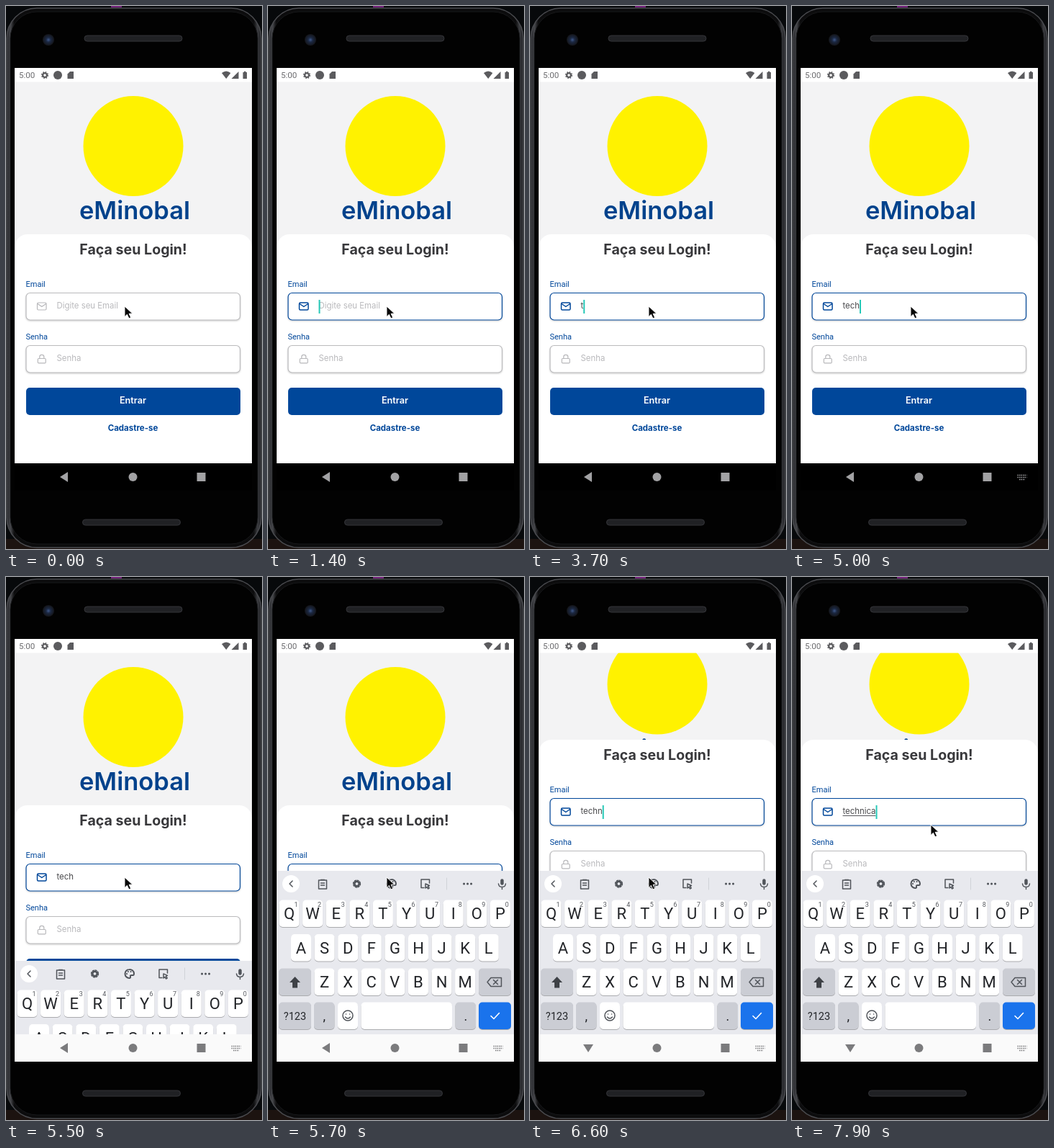
An HTML page that plays this animation: 356 by 754 pixels, repeating every 8000 ms.

```html
<!DOCTYPE html>
<html lang="pt">
<head>
<meta charset="utf-8">
<title>Login</title>
<style>
  html, body { margin: 0; width: 100%; height: 100%; overflow: hidden; background: #07090b; }
  svg { display: block; width: 356px; height: 754px; }
  text { font-family: Inter, sans-serif; }
  .sys { font-family: Roboto, sans-serif; }
  .mid { text-anchor: middle; }
  .field { fill: #fff; stroke: #bcbcbe; stroke-width: 1.2; filter: drop-shadow(0 1.5px 1.2px #0003); }
  .icon { fill: none; stroke: #b8b8bb; stroke-width: 1.2; stroke-linejoin: round; stroke-linecap: round; }
  .focus .field { stroke: #00479a; }
  .focus .icon { stroke: #00479a; stroke-width: 1.5; }
  .hint { font-size: 11.4px; fill: #b9b9bc; }
  .label { font-size: 11px; fill: #00479a; }
  .tool { fill: none; stroke: #50545a; stroke-width: 1.5; stroke-linecap: round; stroke-linejoin: round; }
  .key { filter: drop-shadow(0 1px .4px #0004); }
</style>
</head>
<body>
<svg viewBox="0 0 356 754">
  <defs>
    <linearGradient id="edge">
      <stop offset="0" stop-color="#25262a"/><stop offset=".015" stop-color="#46474b"/>
      <stop offset=".03" stop-color="#0c0c0d"/><stop offset=".97" stop-color="#0c0c0d"/>
      <stop offset=".985" stop-color="#3c3d41"/><stop offset="1" stop-color="#202125"/>
    </linearGradient>
    <radialGradient id="lens">
      <stop offset="0" stop-color="#40598a"/><stop offset=".4" stop-color="#1b2842"/><stop offset="1" stop-color="#141519"/>
    </radialGradient>
    <clipPath id="screen"><rect x="12" y="86" width="330" height="587"/></clipPath>
    <clipPath id="page"><rect x="12" y="105" width="330" height="530"/></clipPath>
    <g id="gear">
      <circle r="3.2" fill="none" stroke-width="2.6"/>
      <circle r="4.9" fill="none" stroke-width="1.5" stroke-dasharray="2 1.85"/>
    </g>
  </defs>

  <!-- phone body -->
  <rect width="356" height="754" fill="#07090b"/>
  <rect x="146" width="15" height="2" fill="#75227c"/>
  <rect y="740" width="356" height="14" fill="#1c1310"/>
  <rect x="1" y="3" width="354" height="749" rx="42" fill="url(#edge)" stroke="#4a4b4f" stroke-width="1.5"/>
  <rect x="6" y="8" width="344" height="739" rx="37" fill="#020202" stroke="#17181a"/>
  <circle cx="59" cy="47" r="8" fill="url(#lens)"/>
  <g fill="#202124" stroke="#343539">
    <rect x="109" y="41" width="136" height="8" rx="4"/>
    <rect x="106.500" y="713" width="136" height="8" rx="4"/>
  </g>
  <rect x="12" y="86" width="330" height="587" fill="#000"/>

  <!-- login page -->
  <g clip-path="url(#page)">
    <rect x="12" y="105" width="330" height="530" fill="#f3f3f4"/>
    <g id="brand">
      <circle cx="177" cy="194.500" r="69.500" fill="#fff200"/>
      <text class="mid" x="179" y="296" font-size="34.5" font-weight="600" fill="#00428c">eMinobal</text>
    </g>
    <g id="card">
      <rect x="12" y="317" width="330" height="440" rx="18" fill="#fff"/>
      <text class="mid" x="177" y="345" font-size="19.6" font-weight="700" fill="#38383b">Faça seu Login!</text>
      <text class="sys label" x="27.500" y="390">Email</text>
      <g id="email">
        <rect class="field" x="28" y="398.500" width="297.500" height="37.500" rx="5.500"/>
        <path class="icon" d="M45 412h9.500q1.500 0 1.500 1.500v7q0 1.500-1.500 1.500H45q-1.500 0-1.500-1.500v-7q0-1.500 1.500-1.500zM44 413.500l5.800 4 5.800-4"/>
        <text class="hint" id="hint" x="70.500" y="420">Digite seu Email</text>
        <text class="hint" id="typed" x="70.500" y="420" style="fill:#48484b"></text>
        <rect id="underline" x="70.500" y="422" height="1" fill="#55555a"/>
        <rect id="caret" y="408" width="2" height="19" fill="#27c9b8"/>
      </g>
      <text class="sys label" x="27.500" y="463">Senha</text>
      <rect class="field" x="28" y="471.500" width="297.500" height="37.500" rx="5.500"/>
      <path class="icon" d="M45.500 489.500h8.500q1.200 0 1.200 1.200v4q0 1.200-1.200 1.200h-8.500q-1.200 0-1.200-1.200v-4q0-1.200 1.200-1.200zM46.800 489v-2q0-2.700 3-2.700t3 2.700v2"/>
      <text class="hint" x="70.500" y="493">Senha</text>
      <rect x="28" y="530" width="298" height="38" rx="5" fill="#00479a"/>
      <text class="mid" x="176.500" y="552" font-size="12.7" font-weight="600" fill="#fff">Entrar</text>
      <text class="mid" x="176.500" y="590" font-size="11.5" font-weight="700" fill="#00479a">Cadastre-se</text>
    </g>
  </g>

  <!-- status bar -->
  <rect x="12" y="86" width="330" height="19.500" fill="#fff"/>
  <g fill="#5b5b5e">
    <text class="sys" x="18" y="100" font-size="11.6" fill="#6b6b6e">5:00</text>
    <use href="#gear" x="54" y="96" stroke="#5b5b5e" transform="translate(5.400 9.600) scale(.9)"/>
    <circle cx="72" cy="96" r="6"/>
    <path d="M89 91h5v10h-8.500v-6.500z"/>
    <path d="M300 93q6.200-5 12.400 0l-6.200 8z"/>
    <path d="M323.500 91v10h-10zM329.500 92h1.500v-1.200h2.500V92h1.500v9h-5.500z"/>
  </g>

  <!-- keyboard and navigation -->
  <g clip-path="url(#screen)">
    <g id="keyboard">
      <rect x="12" y="408" width="330" height="265" fill="#e8e9ee"/>
      <circle cx="32" cy="426" r="12" fill="#fff"/>
      <g class="tool">
        <path d="M34 422l-4 4 4 4"/>
        <path d="M70.500 421h11v12h-11zM73.500 420.500h5M73.500 425h5M73.500 428h5"/>
        <use href="#gear" x="123.500" y="426"/>
        <path d="M171.500 420a6 6 0 0 0 0 12q2 0 1.500-2t1.500-2h2q1.500 0 1.500-2.500a6 6 0 0 0-6.500-5.500zM168 426h.1M169.800 423h.1M173.500 423h.1" stroke-width="2"/>
        <path d="M217 431.500h-4v-11.500h11.500v5M219 426l5.500 2.500-2.200 1 2 2.500-1.500 1-2-2.500-1.800 1.500z"/>
        <path d="M248.500 418v16" stroke="#d0d2d7" stroke-width="1"/>
        <path d="M272.500 426h.1M277.500 426h.1M282.500 426h.1" stroke-width="3"/>
        <path d="M325.500 421.500v4" stroke-width="4.500"/>
        <path d="M320.500 426q.500 4.500 5 4.500t5-4.500M325.500 430.500v3"/>
      </g>
      <g id="keys"></g>
      <path d="M37.500 555l7.500 8h-4v7.500h-7V563h-4z" fill="#3e4146"/>
      <g class="tool">
        <path d="M310 556.500h14.500v12H310l-5-6zM313.500 559.500l6 6M319.500 559.500l-6 6"/>
        <circle cx="111" cy="609" r="7"/>
        <path d="M108.500 607h.1M113.500 607h.1M107.500 611q3.500 4 7 0"/>
        <path d="M310 609.500l4 4 7.500-8" stroke="#fff" stroke-width="1.6"/>
      </g>
    </g>
    <rect id="navBack" x="12" y="635" width="330" height="38" fill="#fafafa"/>
    <g id="nav">
      <path id="back" d="M75 654l11-7v14z"/>
      <circle cx="176.500" cy="654" r="6"/>
      <rect x="265.500" y="648" width="12" height="12"/>
      <path id="imeIcon" d="M313.500 651.500h13M313.500 654.500h13M316 657.500h8" fill="none" stroke-width="1.5" stroke-dasharray="1.500 1"/>
    </g>
  </g>
  <path id="mouse" d="M0 0v14.500l3.400-3.200 2.600 5.500 2.600-1.200-2.500-5.300 4.700-.300z" fill="#080808" stroke="#fff" stroke-width=".9"/>
</svg>
<script>
const LOOP = 8000;
const $ = id => document.getElementById(id);

function key(x, y, w, label, { fill = '#fff', size = 22, digit } = {}) {
  const dark = '#222428';
  return `<rect class="key" x="${x}" y="${y}" width="${w}" height="37.500" rx="5" fill="${fill}"/>
    <text class="sys mid" x="${x + w / 2}" y="${y + 19 + size * .36}" font-size="${size}" fill="${dark}">${label}</text>` +
    (digit === undefined ? '' : `<text class="sys mid" x="${x + w - 4.500}" y="${y + 9}" font-size="9" fill="#55585e">${digit}</text>`);
}

function row(letters, center, y, numbered) {
  return [...letters].map((c, i) =>
    key(center + i * 32.600 - 14, y, 28, c, numbered ? { digit: (i + 1) % 10 } : {})).join('');
}

const gray = '#cbcdd4';
$('keys').innerHTML =
  row('QWERTYUIOP', 29.500, 448.500, true) +
  row('ASDFGHJKL', 46, 496) +
  row('ZXCVBNM', 78.500, 543.500) +
  key(15, 543.500, 45, '', { fill: gray }) +
  key(293, 543.500, 45, '', { fill: gray }) +
  key(15, 590.500, 45, '?123', { fill: gray, size: 14.500 }) +
  key(64, 590.500, 28.500, ',', { fill: gray, size: 18 }) +
  key(97, 590.500, 28, '') +
  key(129.500, 590.500, 126.500, '') +
  key(260.500, 590.500, 28.500, '.', { fill: gray, size: 18 }) +
  key(293, 590.500, 45, '', { fill: '#1a73ec' });

const word = 'technica';
const strokes = [3700, 4000, 4300, 4900, 6400, 6900, 7200, 7500];
const mousePath = [[7300, 165, 417], [7500, 170, 407], [7700, 178, 386], [7900, 193, 344]];

const progress = (t, from, to) => Math.min(1, Math.max(0, (t - from) / (to - from)));
const easeOut = p => 1 - (1 - p) ** 2;
const show = (id, on) => $(id).setAttribute('visibility', on ? 'visible' : 'hidden');
const shift = (id, x, y) => $(id).setAttribute('transform', `translate(${x} ${y})`);

function mouseAt(t) {
  const next = mousePath.findIndex(p => p[0] > t);
  if (next < 1) return (next ? mousePath.at(-1) : mousePath[0]).slice(1);
  const [a, b] = [mousePath[next - 1], mousePath[next]];
  const p = progress(t, a[0], b[0]);
  return [a[1] + (b[1] - a[1]) * p, a[2] + (b[2] - a[2]) * p];
}

function draw(t) {
  const focused = t >= 1400;
  const count = strokes.filter(s => s <= t).length;
  const lastInput = count ? strokes[count - 1] : 1400;
  $('email').classList.toggle('focus', focused);
  $('typed').textContent = word.slice(0, count);
  const width = count ? $('typed').getComputedTextLength() : 0;
  show('hint', !count);
  $('caret').setAttribute('x', 70.500 + width);
  const blinkOn = Math.floor((t - lastInput) / 500) % 2 === 0;
  show('caret', focused && (blinkOn || (t >= 3300 && t < 3700) || (t >= 5000 && t < 5500)));
  $('underline').setAttribute('width', width);
  show('underline', t >= 7700);

  const scroll = easeOut(progress(t, 5930, 6100));
  shift('brand', 0, -45.500 * scroll);
  shift('card', 0, -91 * scroll);

  const open = t >= 5500;
  show('keyboard', open);
  shift('keyboard', 0, 230 * (1 - easeOut(progress(t, 5430, 5700))));
  show('navBack', open);
  $('nav').setAttribute('fill', open ? '#7b7b7d' : '#a2a2a4');
  $('nav').setAttribute('stroke', open ? '#7b7b7d' : '#a2a2a4');
  $('nav').setAttribute('stroke-width', 0);
  show('imeIcon', t >= 4000);
  $('back').setAttribute('transform', t >= 6400 ? 'rotate(-90 81 654)' : '');
  shift('mouse', ...mouseAt(t));
}

function tick() {
  draw(performance.now() % LOOP);
  requestAnimationFrame(tick);
}
tick();
</script>
</body>
</html>
```
